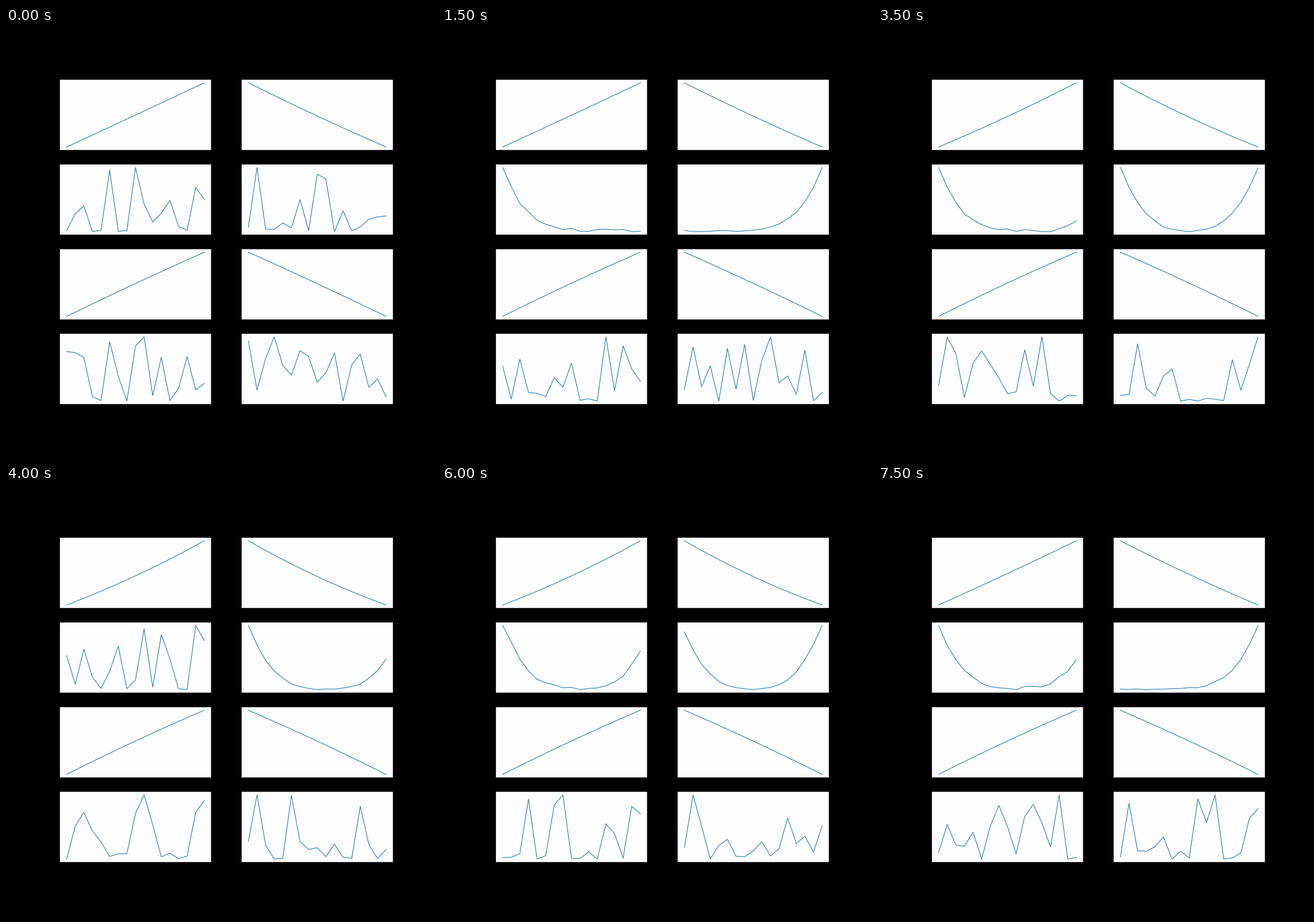
A matplotlib script for the animation above (8000 ms loop, 748 px wide and 748 px high).

```python
import numpy as np
import matplotlib.pyplot as plt
from matplotlib.animation import FuncAnimation

STEPS = 16
POINTS = 17
t = np.linspace(0, 1, POINTS)

# where the bowl bottoms out: key steps and positions along the panel
LEFT_LOW = (3, 5, 10, 12, 15), (.8, .55, .75, .55, .56)
RIGHT_LOW = (3, 5, 8, 10, 12, 15), (.1, .38, .56, .35, .49, .1)


def unit(y):
    return (y - y.min()) / (y.max() - y.min())


def bent(k):
    """Rising line from 0 to 1; positive k sags, negative k bulges."""
    return t + k * (t * t - t)


def spikes(step, seed):
    rng = np.random.default_rng([seed, step])
    return unit(rng.uniform(0, 1, POINTS) ** 2)


def bowl(step, seed, lows, noise):
    """Valley around a moving low point, steeper the further off centre."""
    rng = np.random.default_rng([seed, step])
    low = np.interp(step, *lows)
    y = unit(np.abs(t - low) ** (2.7 + 6 * abs(low - .5)))
    return unit(y + noise * rng.uniform(-1, 1, POINTS))


def curves(step):
    sag = .68 / (1 + .67 * (step - 10) ** 2)
    bulge = -.045 - .035 * min(step / 5, 1)
    # the bowls dissolve into spikes at a fixed period
    left = bowl(step, 11, LEFT_LOW, .03) if step % 8 else spikes(step, 11)
    right = bowl(step, 12, RIGHT_LOW, .012) if step % 16 else spikes(step, 12)
    return (
        bent(sag),
        bent(.9 * sag + .06)[::-1],
        left,
        right,
        bent(bulge),
        bent(bulge + .01)[::-1],
        spikes(step, 13),
        spikes(step, 14),
    )


fig, axes = plt.subplots(4, 2, figsize=(11, 11), dpi=68, facecolor="black")
fig.subplots_adjust(left=.125, right=.9, bottom=.125, top=.88,
                    wspace=.2, hspace=.2)
lines = []
for ax in axes.flat:
    ax.set(facecolor="#fdfdfd", xticks=[], yticks=[],
           xlim=(-.05, 1.05), ylim=(-.05, 1.05))
    ax.patch.set_snap(False)
    for spine in ax.spines.values():
        spine.set(linewidth=.6, snap=False)
    lines += ax.plot(t, t, color="#1f77b4", lw=1.15)


def update(step):
    for line, y in zip(lines, curves(step)):
        line.set_ydata(y)
    return lines


anim = FuncAnimation(fig, update, frames=STEPS, interval=500,
                     init_func=lambda: update(0), repeat=True, repeat_delay=0)
plt.show()
```
